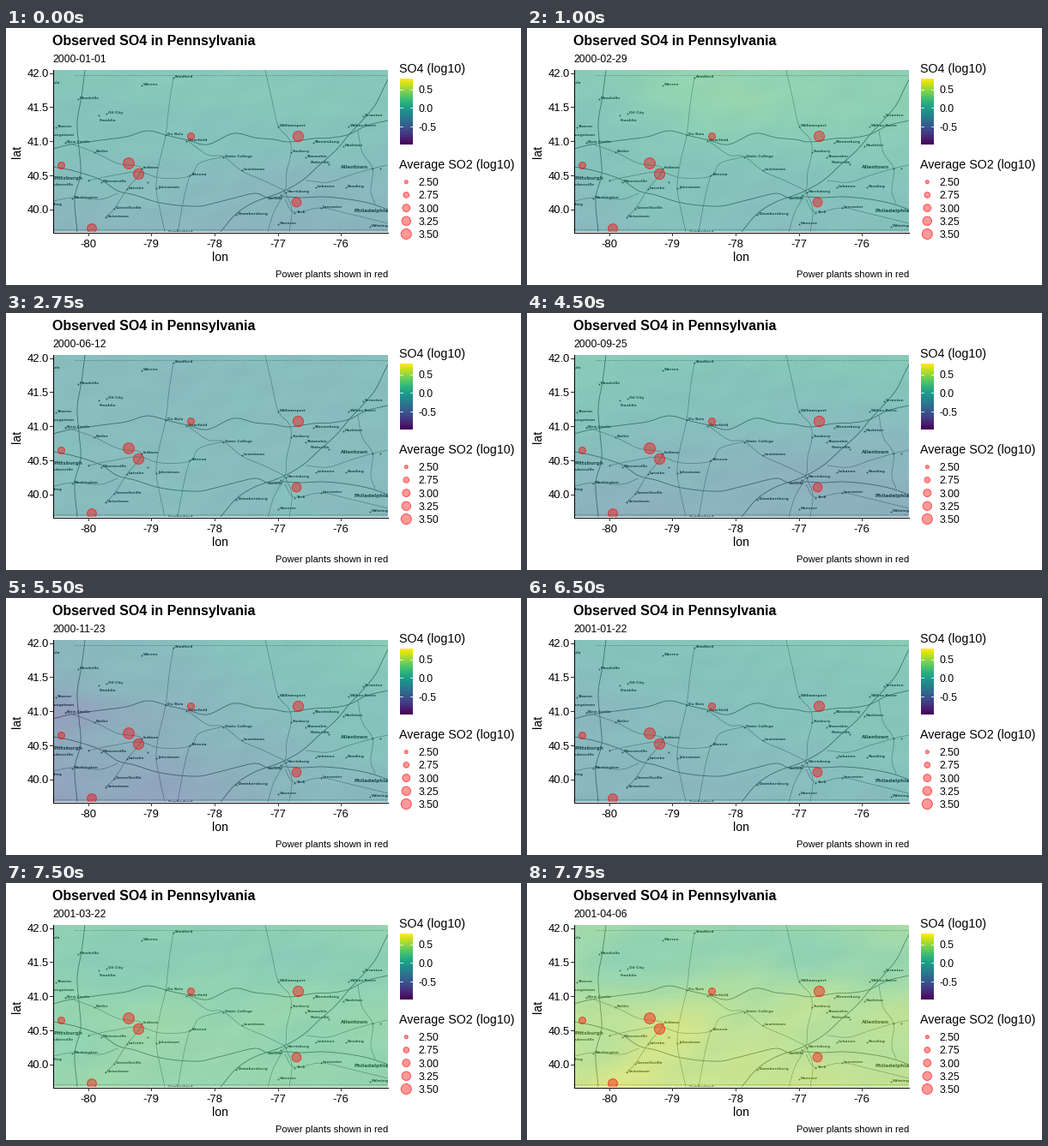
These frames come from a looping animation (600 px wide and 300 px high, 8 s). A matplotlib script:

```python
import numpy as np
import matplotlib.pyplot as plt
from matplotlib.animation import FuncAnimation
from matplotlib.patches import Circle

W, H, DPI = 600, 300, 100
PX = 72 / DPI
LEFT, RIGHT, TOP, BOTTOM = 55, 445, 49, 238
FRAMES, STEP = 32, 250
DAYS_PER_FRAME = 14.893
START = np.datetime64("2000-01-01")

plt.rcParams["font.family"] = "Liberation Sans"
fig = plt.figure(figsize=(W / DPI, H / DPI), dpi=DPI, facecolor="white")


def pixel_axes(x0, x1, y0, y1):
    ax = fig.add_axes([x0 / W, 1 - y1 / H, (x1 - x0) / W, (y1 - y0) / H])
    ax.set(xlim=(x0, x1), ylim=(y1, y0))
    ax.axis("off")
    return ax


panel = pixel_axes(LEFT, RIGHT, TOP, BOTTOM)
page = pixel_axes(0, W, 0, H)


def write(x, y, text, size, **kw):
    return page.text(x, y, text, fontsize=size * PX, va=kw.pop("va", "baseline"), **kw)


def line(ax, xs, ys, color="black", width=1.0, **kw):
    ax.plot(xs, ys, color=color, lw=width * PX, **kw)


def bubble(ax, x, y, r):
    ax.add_patch(Circle((x, y), r, facecolor=(1, 0, 0, 0.4),
                        edgecolor=(1, 0, 0, 0.6), lw=PX, zorder=6))


def smooth(points, n=8):
    """Catmull-Rom curve through the points."""
    p = np.array(points, float)
    p = np.vstack([2 * p[0] - p[1], p, 2 * p[-1] - p[-2]])
    t = np.linspace(0, 1, n)[:, None]
    parts = []
    for a, b, c, d in zip(p, p[1:], p[2:], p[3:]):
        parts.append(0.5 * (2 * b + (c - a) * t + (2 * a - 5 * b + 4 * c - d) * t**2
                            + (3 * b - a - 3 * c + d) * t**3))
    return np.vstack(parts).T


# Base map
HIGHWAYS = [
    [(55, 141), (75, 136), (110, 131), (140, 127), (165, 120), (190, 126), (212, 131),
     (235, 136), (265, 123), (290, 128), (312, 130), (330, 133), (358, 129),
     (380, 128), (400, 124), (420, 114), (445, 108)],
    [(55, 162), (80, 167), (110, 177), (130, 190), (150, 195), (175, 203), (200, 207),
     (225, 208), (240, 205), (260, 200), (290, 193), (305, 198), (325, 197),
     (345, 198), (370, 197), (400, 200), (425, 205), (445, 212)],
    [(92, 49), (88, 80), (83, 110), (85, 140), (87, 170), (80, 199), (83, 238)],
    [(250, 238), (268, 217), (290, 203), (320, 192), (345, 178), (365, 160),
     (385, 142), (400, 124), (415, 108), (430, 90), (440, 70), (445, 60)],
]
ROADS = [
    [(55, 202), (78, 198), (110, 200), (130, 193)],
    [(96, 178), (125, 172), (155, 168), (180, 175), (214, 173), (225, 158), (253, 150)],
    [(212, 132), (235, 148), (253, 150), (275, 167), (300, 178), (325, 190)],
    [(325, 191), (333, 212), (330, 238)],
    [(350, 178), (375, 180), (400, 172), (427, 164), (445, 160)],
    [(302, 49), (309, 80), (317, 114), (330, 130), (332, 146), (327, 168),
     (325, 190), (312, 215), (305, 238)],
    [(195, 58), (190, 90), (186, 125), (178, 160), (175, 187), (180, 215), (185, 238)],
    [(214, 172), (208, 195), (200, 238)],
    [(69, 133), (103, 145), (130, 158), (158, 164), (141, 188), (126, 211), (116, 221)],
    [(325, 200), (336, 215), (367, 210), (400, 217), (445, 228)],
    [(410, 120), (415, 145), (427, 164), (425, 190), (430, 205)],
]
WEST = [
    ("Bradford", 195, 58), ("Warren", 158, 67), ("Meadville", 84, 83),
    ("Oil City", 117, 100), ("Sharon", 58, 116), ("New Castle", 69, 134),
    ("Butler", 103, 145), ("Du Bois", 186, 125), ("Clearfield", 210, 132),
    ("Indiana", 158, 164), ("Monroeville", 111, 180), ("Latrobe", 141, 188),
    ("Johnstown", 175, 187), ("Altoona", 214, 172), ("Washington", 77, 199),
    ("Connellsville", 126, 211), ("Uniontown", 116, 221),
]
EAST = [
    ("Williamsport", 317, 115), ("Bloomsburg", 358, 134), ("Sunbury", 332, 145),
    ("Shamokin", 349, 151), ("Hazleton", 393, 138), ("Wilkes-Barre", 399, 115),
    ("Scranton", 416, 103), ("State College", 253, 151), ("Lewistown", 275, 166),
    ("Harrisburg", 326, 192), ("Lebanon", 361, 186), ("Reading", 396, 186),
    ("Lancaster", 367, 210), ("York", 336, 216), ("Chambersburg", 268, 218),
    ("Hanover", 317, 229), ("Wilmington", 424, 232),
]
# Labels set apart from their dots: text, x, y, size, alignment
LOOSE = [
    ("Pittsburgh", 56, 174.5, 5.7, "left"), ("Allentown", 390, 161.5, 5.7, "left"),
    ("Philadelphia", 406, 212.5, 5.8, "left"), ("Franklin", 109, 107, 4.3, "left"),
    ("Youngstown", 79, 124, 4.3, "right"), ("Steubenville", 79, 182, 4.3, "right"),
    ("Wheeling", 66, 205.5, 4.3, "right"), ("Ashtabula", 63, 63, 4.3, "right"),
    ("Pottsville", 377, 156, 4.3, "right"), ("Carlisle", 323, 198, 4.3, "right"),
    ("Cumberland", 189, 237.5, 4.3, "left"),
]
DOTS = [(108, 102), (96, 178), (427, 164), (376, 159), (320, 195), (165, 180), (436, 164)]


def label(text, x, y, size=4.3, ha="left"):
    panel.text(x, y + size * 0.36, text, fontsize=size * PX, color="#151515", ha=ha,
               va="baseline", family="DejaVu Sans", weight="bold", clip_on=True, zorder=3)


yy, xx = np.mgrid[TOP:BOTTOM, LEFT:RIGHT]
ridge = np.sin(0.16 * yy + 0.05 * xx + 2 * np.sin(xx / 47)) * np.sin(xx / 23 - yy / 17)
EXTENT = (LEFT, RIGHT, BOTTOM, TOP)
panel.imshow(0.93 + 0.014 * ridge, cmap="gray", vmin=0, vmax=1, extent=EXTENT,
             aspect="auto", zorder=0)
for roads, color, width in ((HIGHWAYS, "#4a4a4a", 0.8), (ROADS, "#777777", 0.7)):
    for road in roads:
        line(panel, *smooth(road), color, width, zorder=1)
for x0, y in ((80, 54.5), (55, 234.5)):
    line(panel, (x0, RIGHT), (y, y), "#555555", 0.8, ls=(0, (1.5, 2)), zorder=1)
for name, x, y in WEST + EAST:
    label(name, x + 2, y - 2)
for item in LOOSE:
    label(*item)
xs, ys = np.array([city[1:] for city in WEST + EAST] + DOTS).T
panel.plot(xs, ys, "s", ms=1.6 * PX, color="#111111", mew=0, zorder=3)

# Concentration field, in units of the colour scale
NX, NY = 78, 38
v, u = np.mgrid[0:1:NY * 1j, 0:1:NX * 1j]


def field(seed, base, du, dv, rough, bumps):
    rng = np.random.default_rng(seed)
    z = base + du * (u - 0.5) + dv * (v - 0.5)
    for _ in range(14):
        kx, ky = rng.normal(0, 11), rng.normal(0, 9)
        z += rough * 0.35 * np.cos(kx * u + ky * v + rng.uniform(0, 6.28))
    for x, y, sx, sy, height in bumps:
        z += height * np.exp(-((u - x) / sx) ** 2 - ((v - y) / sy) ** 2)
    return z


KEYS = {
    0: field(1, 0.51, 0.0, -0.15, 0.012, [(0.75, 0.8, 0.25, 0.2, -0.04)]),
    7: field(2, 0.62, 0.06, -0.12, 0.018,
             [(0.45, 0.2, 0.3, 0.3, 0.09), (0.0, 0.6, 0.15, 0.5, -0.07)]),
    11: field(3, 0.49, 0.0, -0.03, 0.012, [(0.55, 0.1, 0.1, 0.1, -0.03)]),
    18: field(4, 0.49, -0.03, -0.2, 0.014, [(0.7, 0.72, 0.3, 0.2, -0.06)]),
    22: field(5, 0.46, 0.16, -0.12, 0.016,
              [(0.0, 0.45, 0.3, 0.12, -0.12), (0.2, 0.85, 0.35, 0.25, -0.06)]),
    29: field(6, 0.56, 0.0, -0.06, 0.008, []),
    31: field(7, 0.80, 0.0, 0.12, 0.028,
              [(0.25, 0.85, 0.3, 0.22, 0.07), (0.4, 0.12, 0.25, 0.18, -0.1),
               (0.7, 0.25, 0.12, 0.15, -0.04)]),
}
TIMES = sorted(KEYS)


def field_at(i):
    for a, b in zip(TIMES, TIMES[1:]):
        if a <= i <= b:
            t = (i - a) / (b - a)
            return (1 - t) * KEYS[a] + t * KEYS[b]


tiles = panel.imshow(KEYS[0], cmap="viridis", vmin=0, vmax=1, alpha=0.5, extent=EXTENT,
                     aspect="auto", interpolation="nearest", zorder=4)
for plant in ((64.5, 160.5, 4), (143, 158, 6.4), (154.5, 170.5, 6.1), (215.5, 126.5, 4),
              (340.5, 126.5, 6.1), (338.5, 203.5, 5.4), (100, 234, 5.4)):
    bubble(panel, *plant)
panel.set(xlim=(LEFT, RIGHT), ylim=(BOTTOM, TOP))

# Axes and titles
line(page, (54.5, 54.5), (TOP, BOTTOM + 0.5))
line(page, (54.5, RIGHT), (BOTTOM + 0.5, BOTTOM + 0.5))
for i in range(5):
    x, y = 95.5 + 73.7 * i, 52.5 + 39.8 * i
    line(page, (x, x), (239, 242), "#333333")
    line(page, (51, 54), (y, y), "#333333")
    write(x, 256.5, str(i - 80), 13, ha="center")
    write(49.5, y + 4.7, f"{42 - i / 2:.1f}", 13, ha="right")
write(249.5, 272.5, "lon", 14, ha="center")
write(13, 144, "lat", 14, ha="center", va="center", rotation=90)
write(54, 20.3, "Observed SO4 in Pennsylvania", 16, weight="bold")
subtitle = write(54, 40, "", 12.2)
write(445, 291, "Power plants shown in red", 11.1, ha="right")

# Legends
write(458.5, 52, "SO4 (log10)", 14.3)
page.imshow(np.linspace(1, 0, 76)[:, None], cmap="viridis", extent=(459, 474, 136.5, 60),
            aspect="auto")
for y, text in ((71.5, "0.5"), (93.3, "0.0"), (115.2, "-0.5")):
    write(480.5, y + 4.3, text, 12.3)
    for x in (459, 471):
        line(page, (x, x + 3), (y, y), "white", 0.8)
write(458.5, 164, "Average SO2 (log10)", 14.3)
for i, r in enumerate((2, 3.3, 4.4, 5.2, 6)):
    y = 179.7 + 15.2 * i
    bubble(page, 466.3, y, r)
    write(480.5, y + 4.6, f"{2.5 + i / 4:.2f}", 12.3)
page.set(xlim=(0, W), ylim=(H, 0))


def update(i):
    tiles.set_data(field_at(i))
    subtitle.set_text(str(START + int(i * DAYS_PER_FRAME)))
    return tiles, subtitle


anim = FuncAnimation(fig, update, frames=FRAMES, interval=STEP, repeat=True,
                     repeat_delay=0, blit=False)
plt.show()
```
